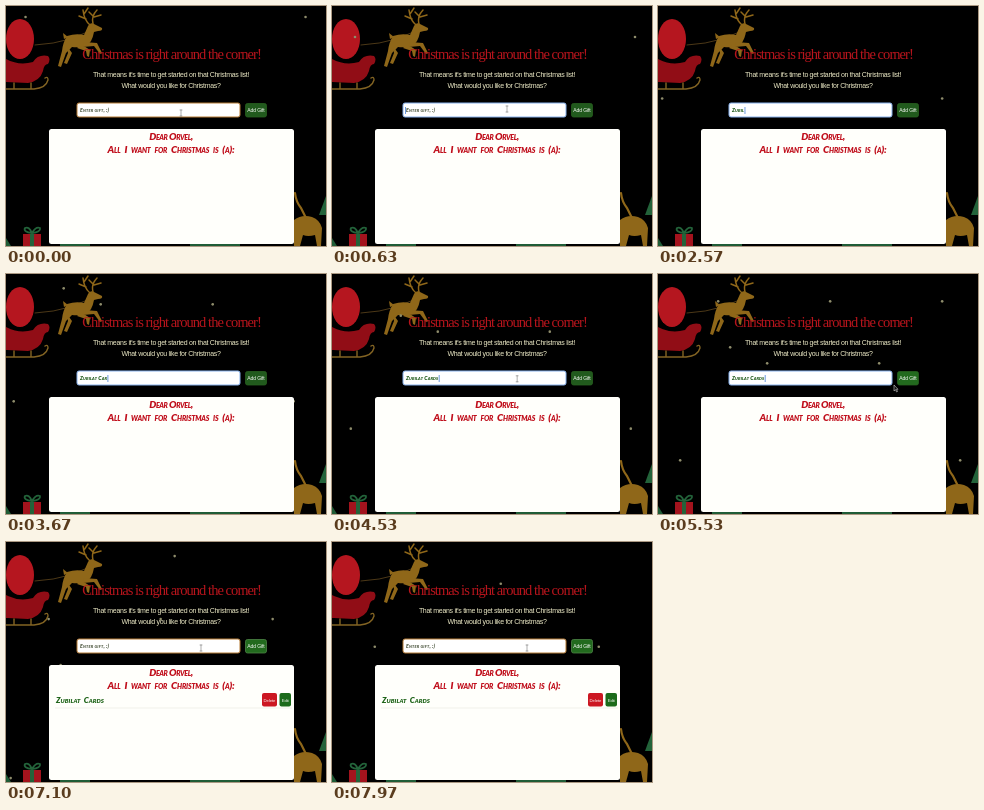
Animation, 320 px wide and 240 px high, one loop 8 s. Source, as an HTML page:

```html
<!DOCTYPE html>
<html lang="en">
<head>
<meta charset="utf-8">
<title>Christmas list</title>
<style>
  html, body { margin: 0; width: 100%; height: 100%; overflow: hidden; background: #000; }
  svg { display: block; width: 100vw; height: 100vh; }
  text { font-family: "Liberation Sans", Arial, sans-serif; fill: #fff; }
  .mid { text-anchor: middle; }
  .title { font: 14.5px "Liberation Serif", serif; letter-spacing: -.95px; fill: #b8141c; }
  .sub { font-size: 7px; letter-spacing: -.31px; fill: #efecc8; }
  .hand { font-family: Lato, sans-serif; font-weight: 900; font-style: italic; font-variant: small-caps; }
  .head { font-size: 10px; letter-spacing: -.4px; fill: #c00f1c; }
  .wide { letter-spacing: -.18px; word-spacing: 2px; }
  .entry { font-size: 5.2px; letter-spacing: .15px; }
  .item { font-size: 8px; fill: #1c6216; word-spacing: 1.5px; letter-spacing: .05px; }
  .label { font-size: 5px; letter-spacing: -.1px; }
  .small { font-size: 4.3px; letter-spacing: -.1px; }
  .line { fill: none; stroke-linecap: round; stroke-linejoin: round; }
</style>
</head>
<body>
<svg viewBox="0 0 320 240" preserveAspectRatio="none">
  <rect width="320" height="240"/>

  <!-- sleigh team -->
  <path class="line" stroke="#6d5122" stroke-width=".7" d="M29 39Q48 38 64 33L84 25"/>
  <ellipse cx="14" cy="33" rx="14" ry="20" fill="#b5161f"/>
  <path fill="#910d16" d="M0 53Q13 60 27 56Q32 48 42 50Q45 53 42 58Q38 58 37 65Q34 75 22 77L0 76Z"/>
  <path class="line" stroke="#836423" stroke-width="1.4" d="M0 83L28 83Q40 82 42 74Q42 70 39 72M8 77V83M25 77V83"/>
  <g fill="#8f6719">
    <path d="M61 30Q70 27 78 29L82 20Q84 16 88 18L96 22Q97 25 92 25L88 26Q86 37 80 40Q72 42 66 41L60 47L55 61L52 60L56 45Q57 36 61 30Z"/>
    <path d="M61 40L66 47L61 58L58 57L62 47ZM78 36L91 37L96 47L94 48L88 40L77 41ZM75 38L84 44L83 51L81 50L80 45L71 42Z"/>
    <path d="M62 31L57 27L58 33Z"/>
  </g>
  <path class="line" stroke="#8f6719" stroke-width="1.5" d="M84 19Q78 14 77 4M80 13L73 10M78 8L82 2M87 18Q85 10 91 4M87 10L83 6M88 11L95 9"/>

  <!-- lower corners -->
  <path fill="#1f5c36" d="M0 232L5 240H0ZM54 237H84V240H54ZM184 237H234V240H184Z"/>
  <path fill="#a3131d" d="M17 228H35V240H17Z"/>
  <path fill="#23633a" d="M24 228H28V240H24Z"/>
  <path class="line" stroke="#23633a" stroke-width="1.8" d="M26 227Q17 226 19 222Q23 220 26 227Q30 220 34 222Q35 226 26 227"/>
  <path fill="#8f6719" d="M288 214Q296 208 306 211Q314 214 316 222L315 240H311L309 229Q302 231 297 229L294 240H288Z"/>
  <path class="line" stroke="#8f6719" stroke-width="2.2" d="M289 187Q290 196 295 202L300 212"/>
  <path fill="#23633a" d="M320 190L313 209H320Z"/>

  <g id="snow" fill="#8f8d6c"></g>

  <text class="title mid" x="165.5" y="53">Christmas is right around the corner!</text>
  <text class="sub mid" x="165" y="71">That means it's time to get started on that Christmas list!</text>
  <text class="sub mid" x="165" y="82">What would you like for Christmas?</text>

  <rect id="field" x="71" y="97" width="163" height="14" rx="2" fill="#fff" stroke-width="1"/>
  <text id="entry" class="hand entry" x="74" y="106"></text>
  <rect id="caret" y="101" width=".7" height="7" fill="#2f6fd0"/>
  <rect id="add" x="239.5" y="97.5" width="21" height="13.5" rx="2" stroke-width=".8"/>
  <text class="label mid" x="250" y="106">Add Gift</text>

  <rect x="43" y="123" width="245" height="115" rx="2.5" fill="#fffffb"/>
  <text class="hand head mid" x="165" y="134">Dear Orvel,</text>
  <text class="hand head wide mid" x="165" y="146.5">All I want for Christmas is (a):</text>

  <g id="gift">
    <text class="hand item" x="50" y="161">Zubilat Cards</text>
    <rect x="256" y="151" width="15" height="13.5" rx="2" fill="#cc1722"/>
    <text class="small mid" x="263.5" y="159.5">Delete</text>
    <rect x="273.5" y="151" width="11.5" height="13.5" rx="2" fill="#1c6b1b"/>
    <text class="small mid" x="279.2" y="159.5">Edit</text>
    <path stroke="#e8e8e0" stroke-width=".6" d="M49 166H286"/>
  </g>

  <g id="pointer">
    <path id="beam" class="line" stroke="#777" stroke-width=".6" d="M-1 -3H1M0 -3V3M-1 3H1"/>
    <path id="arrow" fill="#111" stroke="#eee" stroke-width=".5" d="M-1 -3V3L.5 1.7L1.6 4L2.5 3.5L1.5 1.3H3Z"/>
  </g>
</svg>
<script>
  const LOOP = 8000;
  const WISH = "Zubilat Cards";
  const TYPE_START = 1600, KEY_GAP = 180;
  const FOCUS = 500, SUBMIT = 5900;

  // time, x, y
  const mousePath = [
    [0, 175, 107], [500, 175, 103], [4300, 175, 103],
    [5200, 237, 114], [5530, 237, 114], [5750, 245, 106],
    [6050, 245, 106], [6470, 204, 107], [7100, 195, 106], [8000, 195, 106]
  ];
  // mean x, start y, horizontal gap
  const snowRows = [[13, 11, 280], [51, -148, 112], [100, -86, 112], [177, -211, 280], [63, -102, 280]];
  const FALL = 31.7, SWAY = 10, SWAY_PERIOD = 4600;

  const $ = id => document.getElementById(id);
  const set = (id, name, value) => $(id).setAttribute(name, value);
  const show = (id, on) => set(id, "visibility", on ? "visible" : "hidden");
  const clamp = v => Math.min(1, Math.max(0, v));

  const flakes = snowRows.flatMap(([x, y, gap]) =>
    Array.from({ length: Math.ceil((320 - x) / gap) }, (_, i) => {
      const dot = document.createElementNS("http://www.w3.org/2000/svg", "circle");
      dot.setAttribute("r", 1.3);
      $("snow").append(dot);
      return { dot, x: x + i * gap, y };
    }));

  function mouseAt(t) {
    const n = Math.max(1, mousePath.findIndex(p => p[0] >= t));
    const a = mousePath[n - 1], b = mousePath[n];
    const u = clamp((t - a[0]) / (b[0] - a[0]));
    const e = u * u * (3 - 2 * u);
    return [a[1] + (b[1] - a[1]) * e, a[2] + (b[2] - a[2]) * e];
  }

  function render(t) {
    const sway = SWAY * Math.cos(2 * Math.PI * (t - 630) / SWAY_PERIOD);
    for (const { dot, x, y } of flakes) {
      dot.setAttribute("cx", x + sway);
      dot.setAttribute("cy", y + FALL * t / 1000);
    }

    const sent = t >= SUBMIT;
    const focused = t >= FOCUS && !sent;
    const count = sent ? 0 : Math.max(0, Math.min(WISH.length, Math.floor((t - TYPE_START) / KEY_GAP)));
    const typing = t > TYPE_START && t < 4250;
    $("entry").textContent = count ? WISH.slice(0, count) : "Enter gift, :)";
    set("entry", "style", `fill: ${count ? "#1f5a1a" : "#56604a"}`);
    set("field", "stroke", focused ? "#86b0ec" : "#b57a35");
    set("caret", "x", count ? 74.5 + $("entry").getComputedTextLength() : 73);
    show("caret", focused && (typing || t % 1000 < 650));

    const [mx, my] = mouseAt(t);
    const overButton = mx > 235;
    set("pointer", "transform", `translate(${mx} ${my})`);
    show("beam", !typing && !overButton);
    show("arrow", !typing && overButton);
    set("add", "fill", overButton || sent ? "#226a1e" : "#215a1d");
    set("add", "stroke", sent ? "#4d8346" : "#27601f");
    set("gift", "opacity", clamp((t - SUBMIT) / 760));
  }

  function tick() {
    render(performance.now() % LOOP);
    requestAnimationFrame(tick);
  }
  tick();
</script>
</body>
</html>
```
